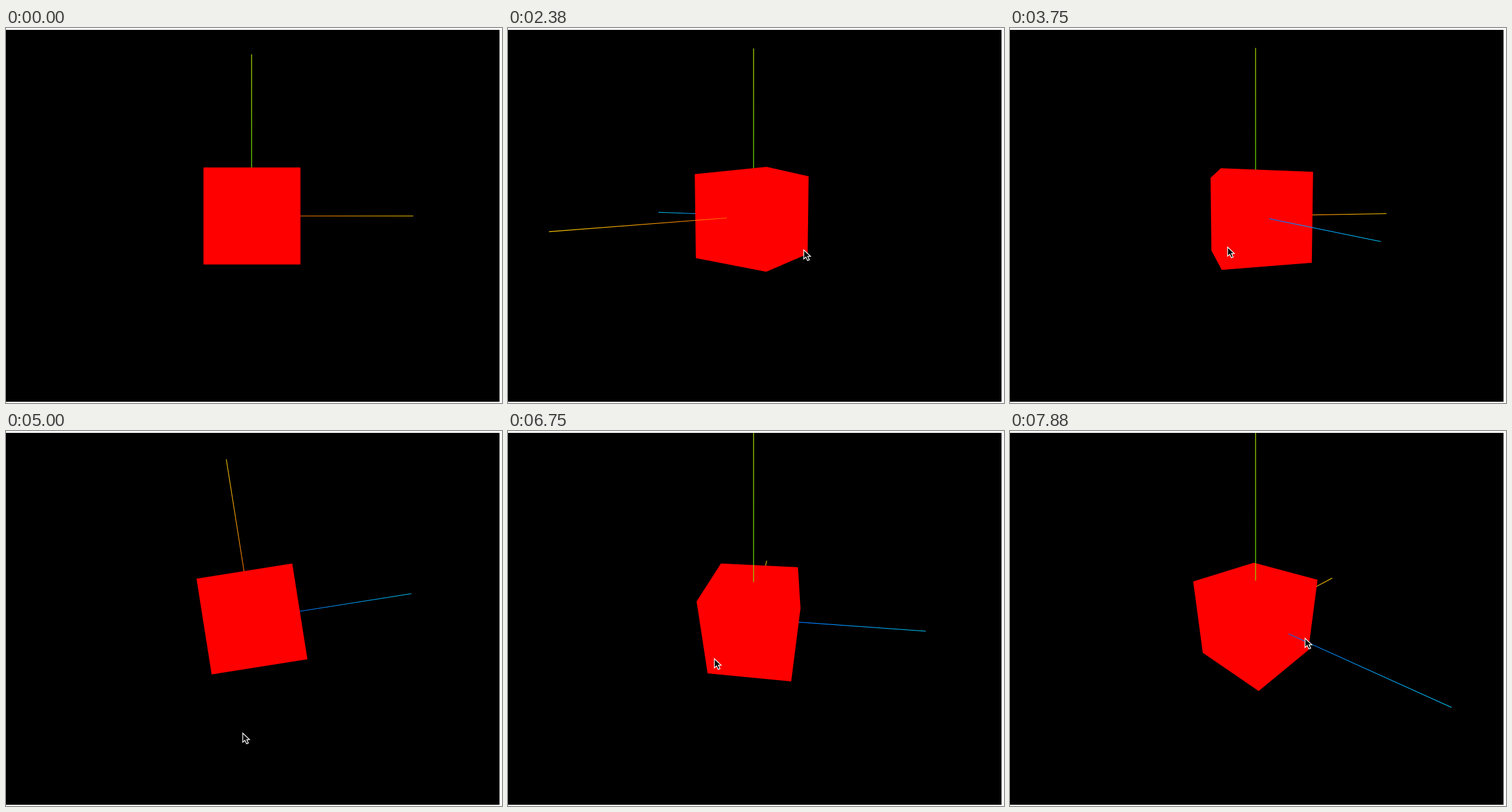
These frames come from a looping animation (800x605 px, 8 s). An HTML page with a canvas:

```html
<!DOCTYPE html>
<html lang="en">
<head>
<meta charset="utf-8">
<title>Orbiting a cube</title>
<style>
  html, body { margin: 0; width: 100%; height: 100%; overflow: hidden; background: #fff; }
  canvas { display: block; }
</style>
</head>
<body>
<canvas id="stage" width="800" height="605"></canvas>
<script>
const ctx = document.getElementById('stage').getContext('2d');
const LOOP = 8000, STEP = 125, POINTER_SHOWS = 375;
const VIEW = { x: 0, y: 3, w: 796, h: 600, cx: 396.7, cy: 303.2 };
const FOCAL = VIEW.h / 2 / Math.tan(37.5 * Math.PI / 180);
const DISTANCE = 3, HALF = 0.5, AXIS_LENGTH = 2;
const DEGREES_PER_PIXEL = 360 / VIEW.h;

// Each drag turns the camera; between drags the pointer glides to the next grip.
const DRAGS = [
  { begin: 910, end: 1250, from: [330, 353], to: [482, 356.7] },
  { begin: 1855, end: 2540, from: [238, 356], to: [553, 358] },
  { begin: 3500, end: 3928, from: [191, 353], to: [465, 353] },
  { begin: 4200, end: 4600, from: [358, 360], to: [382, 509] },
  { begin: 5000, end: 6000, from: [382, 487], to: [401, 180] },
  { begin: 6060, end: 6375, from: [379, 160], to: [333, 367] },
  { begin: 6750, end: 6900, from: [333, 367], to: [461, 365] },
  { begin: 7250, end: 7875, from: [63, 340], to: [476, 334] }
];

const clamp = (v, low, high) => Math.max(low, Math.min(high, v));
const lerp = (a, b, k) => a.map((v, i) => v + (b[i] - v) * k);
const smooth = k => k * k * (3 - 2 * k);

// Replays the drags up to the given time.
function replay(time) {
  let azimuth = 0, elevation = 0;
  let pointer = [330, 496], released = POINTER_SHOWS;
  for (const { begin, end, from, to } of DRAGS) {
    if (time < begin) {
      const k = clamp((time - released) / (begin - released), 0, 1);
      pointer = lerp(pointer, from, smooth(k));
      break;
    }
    pointer = lerp(from, to, clamp((time - begin) / (end - begin), 0, 1));
    azimuth -= (pointer[0] - from[0]) * DEGREES_PER_PIXEL;
    elevation = clamp(elevation + (pointer[1] - from[1]) * DEGREES_PER_PIXEL, -90, 90);
    if (time < end) break;
    released = end;
  }
  return { pointer, azimuth, elevation };
}

function makeCamera(azimuth, elevation) {
  const a = azimuth * Math.PI / 180, e = elevation * Math.PI / 180;
  const sa = Math.sin(a), ca = Math.cos(a), se = Math.sin(e), ce = Math.cos(e);
  const right = [ca, 0, -sa], up = [-se * sa, ce, -se * ca], back = [ce * sa, se, ce * ca];
  const dot = (p, q) => p[0] * q[0] + p[1] * q[1] + p[2] * q[2];
  return {
    position: back.map(v => v * DISTANCE),
    project(p) {
      const scale = FOCAL / (DISTANCE - dot(p, back));
      return [VIEW.cx + dot(p, right) * scale, VIEW.cy - dot(p, up) * scale];
    }
  };
}

// Each axis blends a second channel in linear light, shown as sRGB.
function axisColor(axis, k) {
  const rgb = [0, 0, 0];
  rgb[axis] = 255;
  rgb[[1, 0, 1][axis]] = Math.round(255 * (1.055 * (0.6 * k) ** (1 / 2.4) - 0.055));
  return `rgb(${rgb})`;
}

function drawAxis(camera, axis) {
  const at = d => camera.project([0, 1, 2].map(i => i === axis ? d : 0));
  const from = at(HALF), to = at(AXIS_LENGTH);
  const gradient = ctx.createLinearGradient(...from, ...to);
  for (let stop = 0; stop <= 1; stop += 0.25) {
    gradient.addColorStop(stop, axisColor(axis, 0.25 + 0.75 * stop));
  }
  ctx.save();
  ctx.translate(-0.6, 0);
  ctx.strokeStyle = gradient;
  ctx.lineWidth = 1.1;
  ctx.beginPath();
  ctx.moveTo(...from);
  ctx.lineTo(...to);
  ctx.stroke();
  ctx.restore();
}

function drawCube(camera) {
  ctx.fillStyle = '#f00';
  ctx.beginPath();
  for (let axis = 0; axis < 3; axis++) {
    if (Math.abs(camera.position[axis]) <= HALF) continue;
    const side = Math.sign(camera.position[axis]);
    [[-1, -1], [1, -1], [1, 1], [-1, 1]].forEach(([u, v], i) => {
      const corner = [];
      corner[axis] = side * HALF;
      corner[(axis + 1) % 3] = side * u * HALF;
      corner[(axis + 2) % 3] = v * HALF;
      const point = camera.project(corner);
      if (i) ctx.lineTo(...point); else ctx.moveTo(...point);
    });
    ctx.closePath();
  }
  ctx.fill();
}

const ARROW = new Path2D('M.5 .5V16L4.2 12.6L7 18.6L10 17.3L7.3 11.4H12Z');

function drawPointer([x, y]) {
  ctx.save();
  ctx.translate(x - 0.6, y);
  ctx.scale(0.95, 0.95);
  ctx.fillStyle = '#000';
  ctx.strokeStyle = '#fff';
  ctx.lineWidth = 1.3;
  ctx.fill(ARROW);
  ctx.stroke(ARROW);
  ctx.restore();
}

function draw(time) {
  const { pointer, azimuth, elevation } = replay(time);
  const camera = makeCamera(azimuth, elevation);
  const axes = [0, 1, 2];
  const inFront = axis => camera.position[axis] > HALF;

  ctx.fillStyle = '#fff';
  ctx.fillRect(0, 0, 800, 605);
  ctx.save();
  ctx.beginPath();
  ctx.rect(VIEW.x, VIEW.y, VIEW.w, VIEW.h);
  ctx.clip();
  ctx.fillStyle = '#000';
  ctx.fillRect(VIEW.x, VIEW.y, VIEW.w, VIEW.h);
  axes.filter(axis => !inFront(axis)).forEach(axis => drawAxis(camera, axis));
  drawCube(camera);
  axes.filter(inFront).forEach(axis => drawAxis(camera, axis));
  if (time >= POINTER_SHOWS) drawPointer(pointer);
  ctx.restore();
}

const start = performance.now();

function tick() {
  const time = (performance.now() - start) % LOOP;
  draw(Math.floor(time / STEP) * STEP);
  requestAnimationFrame(tick);
}
tick();
</script>
</body>
</html>
```
